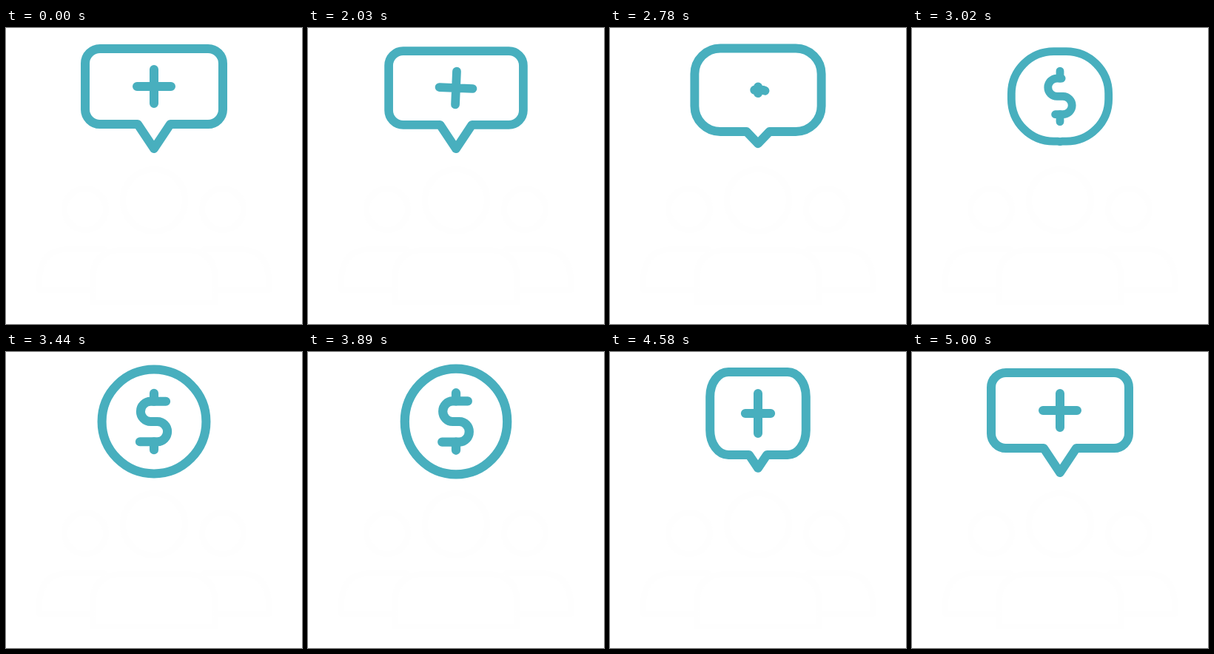
Recreate the animation shown at these times as an HTML page with a canvas. Size 400x400 px, loop 5030 ms.

```html
<!DOCTYPE html>
<html lang="en">
<head>
<meta charset="utf-8">
<style>
html, body { margin: 0; width: 100%; height: 100%; overflow: hidden; background: #fff; }
canvas { display: block; width: 400px; height: 400px; }
</style>
</head>
<body>
<canvas id="stage"></canvas>
<script>
const LOOP = 5030, HOLD = 2030, STEP = 30, EDGE_ON = 4300;
const TEAL = '#48afbe', GHOST = '#fefefe';
const canvas = document.getElementById('stage');
const ctx = canvas.getContext('2d');
const ratio = window.devicePixelRatio || 1;
canvas.width = canvas.height = 400 * ratio;

const lerp = (a, b, f) => a + (b - a) * f;
const ease = {
  in: f => f * f,
  out: f => 1 - Math.pow(1 - f, 2.6),
  io: f => 0.5 - 0.5 * Math.cos(Math.PI * f),
  soft: f => 1 - (1 - f) * (1 - f)
};

// Interpolates rows of [time, value, easing into the row].
function at(keys, t) {
  const i = keys.findIndex(key => key[0] > t);
  if (i < 0) return keys[keys.length - 1][1];
  if (i === 0) return keys[0][1];
  const [t0, a] = keys[i - 1], [t1, b, name] = keys[i];
  return lerp(a, b, ease[name]((t - t0) / (t1 - t0)));
}

// Overall pulse, bubble (0) to coin (1), and the turn of the coin.
const scaleKeys = [
  [2000, 1], [2130, 0.945, 'soft'], [2560, 1.07, 'io'], [3030, 0.9, 'io'],
  [3640, 1.04, 'io'], [4150, 1, 'io']
];
const morphKeys = [[2560, 0], [3160, 1, 'io'], [EDGE_ON, 1, 'io'], [5000, 0, 'out']];
const turnKeys = [[3800, 1], [EDGE_ON, 0.04, 'in'], [5000, 1, 'out']];
// Size of the plus and drawn share of the dollar sign.
const plusKeys = [[2560, 1], [2800, 0, 'in'], [EDGE_ON - 1, 0, 'io'], [EDGE_ON, 1, 'io']];
const dollarKeys = [[2680, 0], [3160, 1, 'io']];

function drawFrame(cy, hx, hy, rx, ry, tip, w) {
  const k = 0.4477, l = -hx, r = hx, top = cy - hy, bot = cy + hy;
  const corner = (x0, y0, cx, cy, x1, y1) => ctx.bezierCurveTo(
    lerp(cx, x0, k), lerp(cy, y0, k), lerp(cx, x1, k), lerp(cy, y1, k), x1, y1);
  ctx.beginPath();
  ctx.moveTo(l + rx, top);
  ctx.lineTo(r - rx, top);
  corner(r - rx, top, r, top, r, top + ry);
  ctx.lineTo(r, bot - ry);
  corner(r, bot - ry, r, bot, r - rx, bot);
  if (tip > 0.1) {
    ctx.lineTo(w, bot);
    ctx.lineTo(0, bot + tip);
    ctx.lineTo(-w, bot);
  }
  ctx.lineTo(l + rx, bot);
  corner(l + rx, bot, l, bot, l, bot - ry);
  ctx.lineTo(l, top + ry);
  corner(l, top + ry, l, top, l + rx, top);
  ctx.closePath();
  ctx.stroke();
}

function drawPlus(cy, hx, hy, deg) {
  ctx.save();
  ctx.translate(0, cy);
  ctx.rotate(deg * Math.PI / 180);
  ctx.beginPath();
  ctx.moveTo(-hx, 0); ctx.lineTo(hx, 0);
  ctx.moveTo(0, -hy); ctx.lineTo(0, hy);
  ctx.stroke();
  ctx.restore();
}

// Narrows the outline only, so the line weight stays the same.
function strokeTurned(cy, turn, trace) {
  ctx.save();
  ctx.translate(0, cy);
  ctx.scale(turn, 1);
  ctx.beginPath();
  trace();
  ctx.restore();
  ctx.stroke();
}

function drawDollar(cy, turn, share) {
  const length = 139;
  if (share < 1) {
    ctx.setLineDash([length * share, length * 2]);
    ctx.lineDashOffset = -length * (1 - share) / 2;
  }
  strokeTurned(cy, turn, () => {
    ctx.moveTo(16, -27);
    ctx.lineTo(-4.5, -27);
    ctx.arc(-4.5, -13.5, 13.5, -Math.PI / 2, Math.PI / 2, true);
    ctx.lineTo(4.5, 0);
    ctx.arc(4.5, 13.5, 13.5, -Math.PI / 2, Math.PI / 2);
    ctx.lineTo(-19, 27);
  });
  ctx.setLineDash([]);
  if (share > 0.6) strokeTurned(cy, turn, () => {
    for (const side of [-1, 1]) {
      ctx.moveTo(0, 27 * side);
      ctx.lineTo(0, 38 * side);
    }
  });
}

function drawPeople() {
  ctx.strokeStyle = GHOST;
  ctx.lineWidth = 8;
  for (const [x, y, r] of [[200, 233, 42], [107, 245, 28], [293, 245, 28]]) {
    ctx.beginPath();
    ctx.arc(x, y, r, 0, Math.PI * 2);
    ctx.stroke();
  }
  ctx.stroke(new Path2D('M117 371V341Q117 300 158 300H242Q283 300 283 341V371Z'));
  ctx.stroke(new Path2D('M117 354H45V338Q47 299 84 299H132M283 354H355V338Q353 299 316 299H268'));
}

function drawBadge(t) {
  const scale = at(scaleKeys, t), morph = at(morphKeys, t), turn = at(turnKeys, t);
  const plus = at(plusKeys, t), dollar = at(dollarKeys, t);
  const rest = (1 - morph) * (1 - morph);
  // The bubble pulses about its tip, the coin about its centre.
  const pivot = lerp(94, 169, rest);
  const cy = lerp(79, 94, morph) - pivot;
  const radius = lerp(20, 70, morph);

  ctx.save();
  ctx.translate(200, pivot);
  ctx.scale(scale, scale);
  ctx.strokeStyle = TEAL;
  ctx.lineWidth = 12;
  drawFrame(cy, lerp(93, 70, morph) * turn, lerp(51, 70, morph),
    radius * turn, radius, 33 * rest, 22 * (1 - morph) * turn);
  if (plus > 0) {
    drawPlus(cy, 23 * plus * turn, lerp(23, 38, morph) * plus, 110 * (1 - scale));
  }
  if (dollar > 0 && t < EDGE_ON) drawDollar(cy, turn, dollar);
  ctx.restore();
}

function draw(t) {
  if (t < HOLD) t = 0;
  else t = HOLD + Math.floor((t - HOLD) / STEP) * STEP;
  ctx.setTransform(ratio, 0, 0, ratio, 0, 0);
  ctx.fillStyle = '#fff';
  ctx.fillRect(0, 0, 400, 400);
  ctx.lineCap = ctx.lineJoin = 'round';
  drawPeople();
  drawBadge(t);
}

const start = performance.now();
function tick() {
  draw((performance.now() - start) % LOOP);
  requestAnimationFrame(tick);
}
tick();
</script>
</body>
</html>
```
